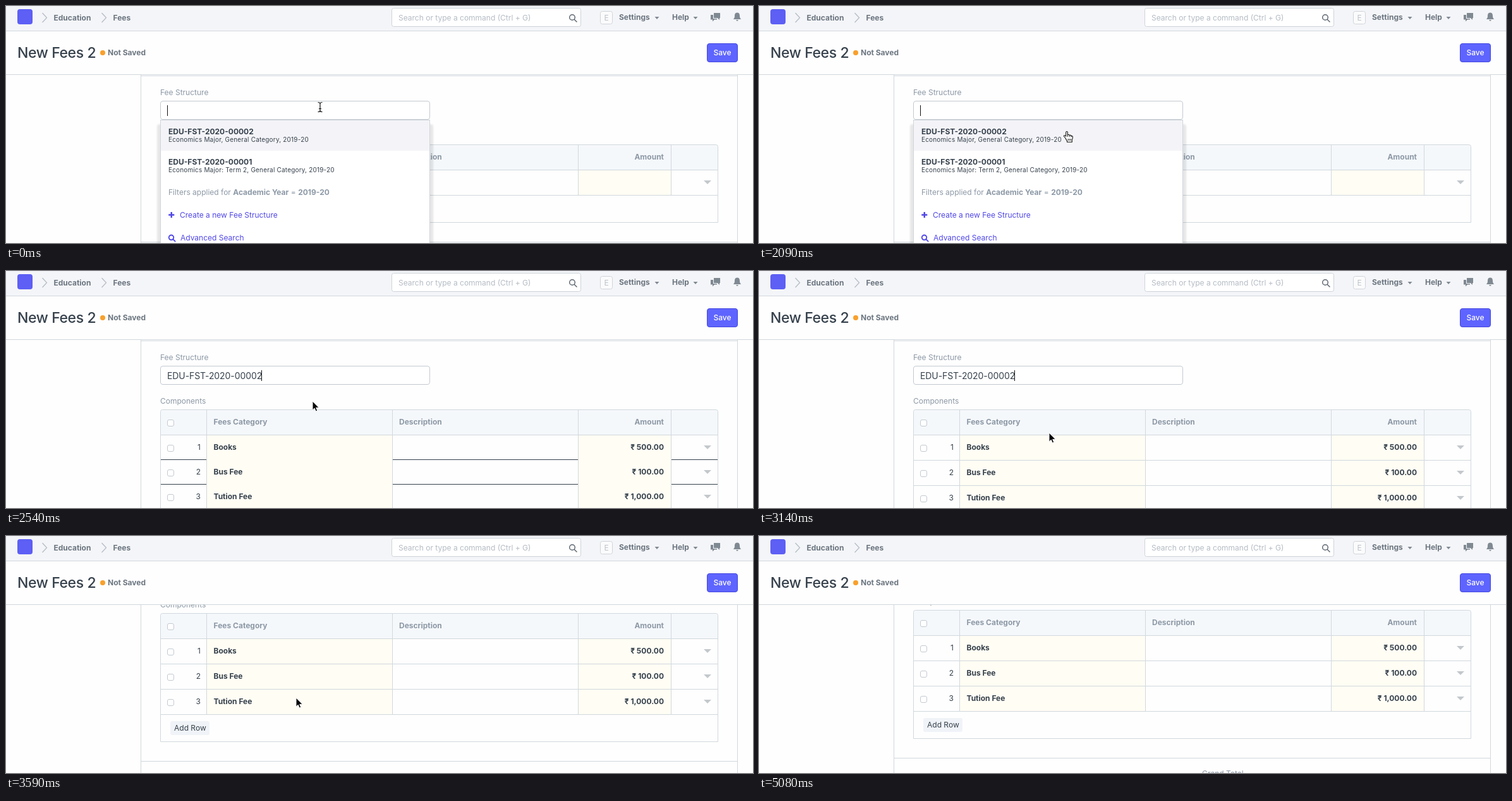
An HTML page that plays this animation: 1182x375 px, repeating every 6700 ms.

```html
<!DOCTYPE html>
<html lang="en">
<head>
<meta charset="utf-8">
<title>Fee form</title>
<style>
html, body { margin: 0; width: 100%; height: 100%; overflow: hidden; background: #fefefe; }
svg { display: block; width: 1182px; height: 375px; font: 12px Inter, "Open Sans", sans-serif; }
.b { font-weight: 700; }
.muted { fill: #8d99a6; }
.dark { fill: #36414c; }
.nav { fill: #6c7680; }
.link { fill: #5148e8; }
.line { fill: #d1d8dd; }
.end { text-anchor: end; }
.mid { text-anchor: middle; }
.small { font-size: 10px; letter-spacing: .18px; }

/* Hard changes on one shared 6.7 s clock */
.clock { animation: 6.7s step-end infinite; }
#menu { animation-name: menu; }
#value { animation-name: value; }
#caret { animation-name: caret; }
#one { animation-name: one; }
#dense { animation-name: dense; }
#full { animation-name: full; }
#page { animation-name: scroll; }
#beam { animation-name: beam; }
#hand { animation-name: hand; }
#arrow { animation-name: arrow; }
@keyframes menu { 0% { opacity: 1 } 33.432%, 100% { opacity: 0 } }
@keyframes value { 0% { opacity: 0 } 33.432%, 100% { opacity: 1 } }
@keyframes one { 0% { opacity: 1 } 35.671%, 100% { opacity: 0 } }
@keyframes dense { 0% { opacity: 0 } 35.671% { opacity: 1 } 40.149%, 100% { opacity: 0 } }
@keyframes full { 0% { opacity: 0 } 40.149%, 100% { opacity: 1 } }
@keyframes caret {
  0% { opacity: 1; transform: none }
  8.955% { opacity: 0; transform: none }
  15.522% { opacity: 1; transform: none }
  22.238% { opacity: 0; transform: none }
  31.194% { opacity: 1; transform: none }
  33.432% { opacity: 1; transform: translateX(149px) }
  40.149% { opacity: 0; transform: translateX(149px) }
  46.865%, 100% { opacity: 1; transform: translateX(149px) }
}
@keyframes scroll {
  0% { transform: none }
  51.343% { transform: translateY(-73px) }
  53.582% { transform: translateY(-97px) }
  55.82%, 100% { transform: translateY(-102px) }
}
@keyframes beam {
  0% { opacity: 1; transform: translate(497px, 160px) }
  15.522% { opacity: 1; transform: translate(496px, 166px) }
  17.761%, 100% { opacity: 0; transform: translate(496px, 166px) }
}
@keyframes hand {
  0% { opacity: 0; transform: translate(487px, 198px) }
  17.761% { opacity: 1; transform: translate(487px, 198px) }
  20% { opacity: 1; transform: translate(487px, 199px) }
  33.432% { opacity: 0; transform: translate(487px, 199px) }
  58.059% { opacity: 1; transform: translate(459px, 257px) }
  67.014% { opacity: 1; transform: translate(627px, 273px) }
  69.104%, 100% { opacity: 0; transform: translate(627px, 273px) }
}
@keyframes arrow {
  0% { opacity: 0; transform: translate(487px, 198px) }
  33.432% { opacity: 1; transform: translate(487px, 198px) }
  37.91% { opacity: 1; transform: translate(485px, 206px) }
  40.149% { opacity: 1; transform: translate(459px, 256px) }
  58.059% { opacity: 0; transform: translate(459px, 256px) }
  69.104% { opacity: 1; transform: translate(1037px, 367px) }
  73.582% { opacity: 1; transform: translate(1100px, 370px) }
  75.82%, 100% { opacity: 0; transform: translate(1100px, 370px) }
}
</style>
</head>
<body>
<svg viewBox="0 0 1182 375">
  <defs>
    <clipPath id="view"><rect y="109" width="1182" height="266"/></clipPath>
    <filter id="blur" x="-5%" width="110%"><feGaussianBlur stdDeviation="1.5"/></filter>
    <g id="lens" fill="none" stroke-linecap="round">
      <circle r="4.3"/><path d="M3.2 3.2L7 7"/>
    </g>
    <path id="chevron" d="M0 0L7 7.5L0 15" fill="none" stroke="#b4bdc6" stroke-width="1.3"/>
    <path id="drop" d="M0 0h7l-3.5 4z" fill="#7f8992"/>
  </defs>

  <g clip-path="url(#view)">
    <g id="page" class="clock">
      <g class="line">
        <rect x="213" y="110" width="945" height="1"/>
        <rect x="213" y="100" width="1" height="400"/>
        <rect x="1157" y="100" width="1" height="400"/>
      </g>
      <text class="muted" x="244" y="141">Fee Structure</text>
      <rect x="244.5" y="150.5" width="426" height="29" rx="3.5" fill="#fff" stroke="#c3cad1"/>
      <text id="value" class="clock dark" x="255" y="171" font-size="14" letter-spacing="-.08">EDU-FST-2020-00002</text>
      <rect id="caret" class="clock" x="255" y="157" width="1" height="17" fill="#111"/>
      <text class="muted" x="244" y="210">Components</text>
      <g id="one" class="clock"></g>
      <g id="dense" class="clock"></g>
      <g id="full" class="clock"></g>
    </g>
    <g id="menu" class="clock">
      <rect x="239" y="187" width="437" height="210" rx="4" fill="#000" opacity=".09" filter="url(#blur)"/>
      <rect x="244.5" y="180.5" width="426" height="210" fill="#fff" stroke="#cfd5da"/>
      <rect x="245" y="181" width="425" height="48" fill="#f4f4f8"/>
      <g class="dark">
        <text class="b" x="257" y="203">EDU-FST-2020-00002</text>
        <text class="small" x="257" y="215">Economics Major, General Category, 2019-20</text>
        <text class="b" x="257" y="251">EDU-FST-2020-00001</text>
        <text class="small" x="257" y="263">Economics Major: Term 2, General Category, 2019-20</text>
      </g>
      <text class="muted" x="257" y="299">Filters applied for <tspan class="b">Academic Year</tspan> = <tspan class="b">2019-20</tspan></text>
      <path class="link" d="M260.5 326h2.5v3.3h3.3v2.5h-3.3v3.3h-2.5v-3.3h-3.3v-2.5h3.3z"/>
      <text class="link" x="275" y="335">Create a new Fee Structure</text>
      <use href="#lens" transform="translate(261.5 366.3) scale(.88)" stroke="#5148e8" stroke-width="2.1"/>
      <text class="link" x="276" y="371">Advanced Search</text>
    </g>
  </g>

  <rect width="1182" height="39" fill="#f4f5f8"/>
  <rect class="line" y="39" width="1182" height="1"/>
  <rect class="line" y="108" width="1182" height="1"/>
  <rect x="18" y="5" width="24" height="24" rx="4" fill="#5d5ff5"/>
  <use href="#chevron" x="57.5" y="11"/>
  <use href="#chevron" x="151.5" y="11"/>
  <g class="nav b">
    <text x="75.5" y="23">Education</text>
    <text x="169.5" y="23">Fees</text>
    <text x="970" y="22">Settings</text>
    <text x="1054" y="22">Help</text>
    <text x="161" y="78">Not Saved</text>
  </g>
  <rect x="610.5" y="3.5" width="299" height="29" rx="3" fill="#fff" stroke="#cdd4da"/>
  <text x="621" y="23" fill="#b5bcc4">Search or type a command (Ctrl + G)</text>
  <use href="#lens" x="896" y="18" stroke="#5f6972" stroke-width="1.5"/>
  <rect x="940.5" y="8.5" width="19" height="20" rx="3" fill="#fbfbfc" stroke="#cfd5da"/>
  <text class="mid" x="950" y="23" fill="#bcc3ca">E</text>
  <use href="#drop" x="1026.5" y="17"/>
  <use href="#drop" x="1087.5" y="17"/>
  <path fill="#7f8992" d="M1120 11h10v8h-1v3l-3-3h-6zM1115 14h4v6h6v1.5h-4l-3 3v-3h-3z"/>
  <path fill="#7f8992" d="M1157 10.5c3.5 0 4 3 4 5.5 0 2.5 1 4 2.3 5h-12.6c1.3-1 2.3-2.5 2.3-5 0-2.5.5-5.5 4-5.5zM1155.3 22h3.4a1.7 1.7 0 0 1-3.4 0z"/>
  <text x="18" y="82" font-size="23" font-weight="500" letter-spacing="-.4" fill="#36414c">New Fees 2</text>
  <circle cx="153" cy="74" r="4" fill="#f9a02c"/>
  <rect x="1109.5" y="59.5" width="48" height="29" rx="3.5" fill="#5e64ff" stroke="#4549e0"/>
  <text class="mid" x="1133.5" y="78" fill="#fff" font-weight="500">Save</text>

  <g id="beam" class="clock" fill="none">
    <path id="stem" d="M-3.5-7.5Q0-7.5 0-5.5Q0-7.5 3.5-7.5M0-5.5V5.5M-3.5 7.5Q0 7.5 0 5.5Q0 7.5 3.5 7.5M-2 2.5H2" stroke="#111" stroke-width="1.2"/>
  </g>
  <g id="hand" class="clock">
    <path d="M-1.8 10.5L-4.3 7.5Q-5 6-3.6 5.7Q-2.5 5.6-1.3 7.3V1Q-1.2-.5 0-.5Q1.3-.5 1.4 1V5.2Q2 4.2 3.2 4.5Q4.2 4.7 4.3 5.7Q5 5 6 5.4Q7 5.7 7 6.7Q8.5 6 9.3 7.4Q9.7 10.5 8.3 13V16.3H.5V14.5Q-1 12.5-1.8 10.5z" fill="#fff" stroke="#111" stroke-width="1.1" stroke-linejoin="round"/>
    <path d="M1.4 5.2V8M4.3 5.7V8.3M7 6.7V8.5M2.2 11v3M4.3 11v3M6.4 11v3" stroke="#111" stroke-width=".9"/>
  </g>
  <path id="arrow" class="clock" d="M0 0V14.2L3.2 11.2L5.3 16L7.7 15L5.7 10.3H10.2z" fill="#050505" stroke="#fff" stroke-width="1"/>
</svg>
<script>
const $ = id => document.getElementById(id);
const rect = (x, y, w, h, attrs = 'class="line"') =>
  `<rect x="${x}" y="${y}" width="${w}" height="${h}" ${attrs}/>`;
const text = (x, y, cls, str) => `<text x="${x}" y="${y}" class="${cls}">${str}</text>`;
const box = y => rect(255.5, y - 4.5, 10, 10, 'rx="2.5" fill="#fff" stroke="#c4cbd2"');

const fees = [['Books', '500'], ['Bus Fee', '100'], ['Tution Fee', '1,000']];
const columns = [317, 611, 905, 1052];
const cream = 'fill="#fffdf4"';
const headY = 219;

// Top-rounded outline from the header down to the given y
const frame = (y, attrs) =>
  `<path d="M244.5 ${y}V222.5q0-3 3-3H1123.5q3 0 3 3V${y}z" ${attrs}/>`;

function row(y, pitch, index, fee) {
  const mid = y + 19;
  const cells = rect(318, y, 293, pitch, cream) + rect(906, y, 146, pitch, cream);
  const words = fee
    ? text(328.5, mid + 4, 'dark b', fee[0]) + text(1041, mid + 4, 'dark b end', `₹ ${fee[1]}.00`)
    : '';
  return cells + box(mid + 1) + text(308, mid + 4, 'dark end', index + 1) + words +
    `<path d="M1104 ${mid - 3}h12l-6 6z" fill="#c3c8cc"/>`;
}

function rowLine(y, heavy) {
  if (!heavy) return rect(245, y, 881, 1);
  return [[245, 72], [612, 293], [1053, 73]]
    .map(([x, w]) => rect(x, y, w, 1, 'fill="#36414c"')).join('');
}

function table(rows, pitch, heavy) {
  const first = headY + 41;
  const foot = headY + 40 + rows.length * pitch;
  return [
    frame(first, 'fill="#f5f8fb"'),
    ...rows.map((fee, i) => row(first + i * pitch, pitch, i, fee)),
    ...columns.map(x => rect(x, headY, 1, foot - headY)),
    rect(245, headY + 40, 881, 1),
    ...rows.map((_, i) => rowLine(first + (i + 1) * pitch - 1, heavy)),
    frame(foot + 43.5, 'fill="none" stroke="#d1d8dd"'),
    box(240),
    text(328.5, 243, 'muted b', 'Fees Category'),
    text(622, 243, 'muted b', 'Description'),
    text(1041, 243, 'muted b end', 'Amount'),
    rect(260, foot + 11, 62, 22, 'rx="3" fill="#f0f3f7"'),
    text(266, foot + 26, 'dark', 'Add Row'),
    rect(213, foot + 74, 945, 1),
    text(701, foot + 103, 'muted', 'Grand Total')
  ].join('');
}

$('one').innerHTML = table([null], 40);
$('dense').innerHTML = table(fees, 39, true);
$('full').innerHTML = table(fees, 40);
</script>
</body>
</html>
```
